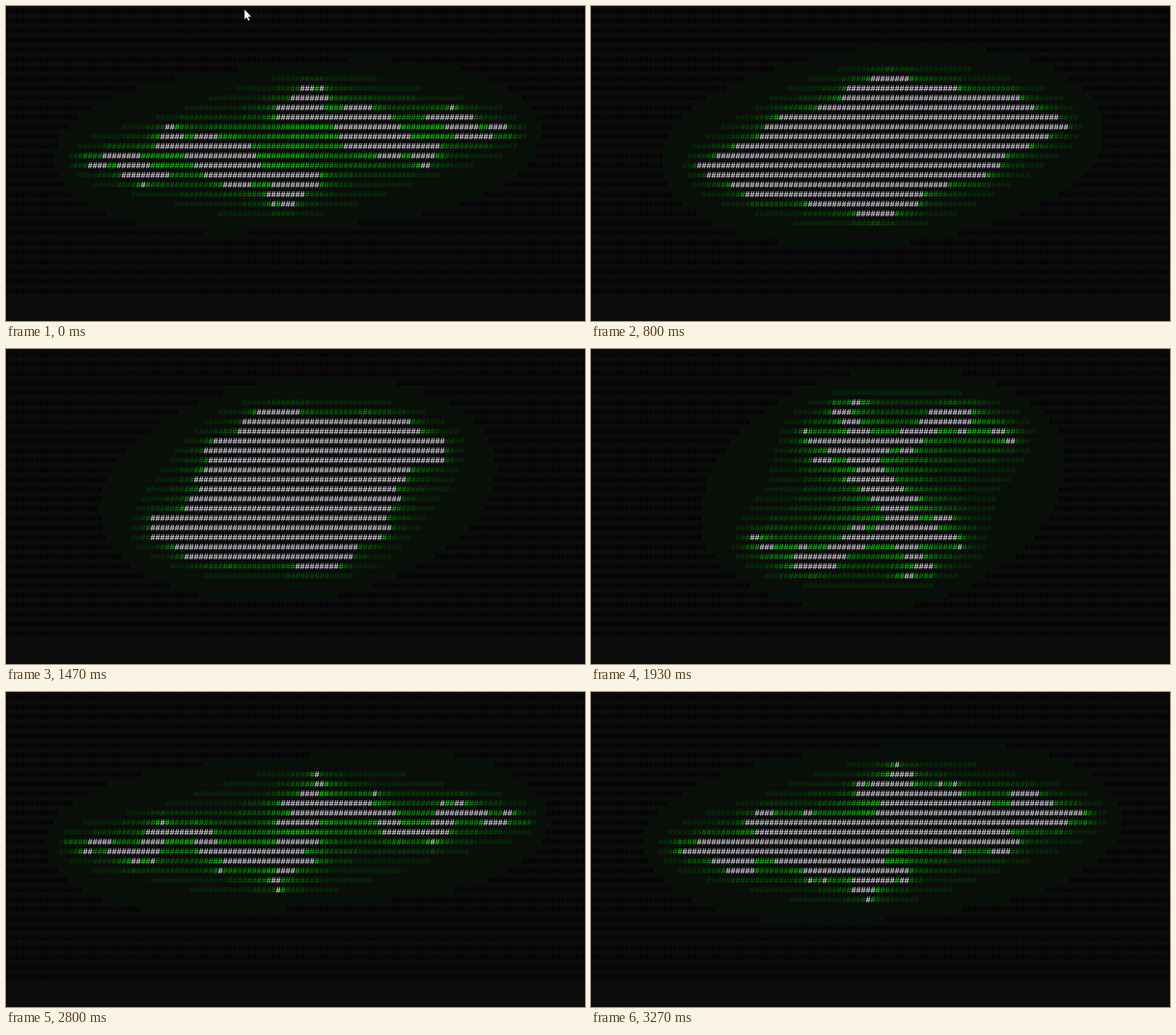
Write an HTML page with a canvas that moves like this. It is 960 px wide and 523 px high and loops after 3340 ms.

```html
<!DOCTYPE html>
<html lang="en">
<head>
<meta charset="utf-8">
<title>Julia set in a terminal</title>
<style>
  html, body { margin: 0; height: 100%; overflow: hidden; background: #0c0c0c; }
  canvas { display: block; }
</style>
</head>
<body>
<canvas id="stage" width="960" height="523"></canvas>
<script>
const ctx = document.getElementById('stage').getContext('2d');
const LOOP = 3340, FPS = 15, STEPS = 50, RESTART = 42;
const COLS = 120, ROWS = 30, CELL_W = 8, CELL_H = 16;
const MAX_ITER = 10;

// Dark to bright green by escape count, white for points that stay.
function colorOf(n) {
  return n === MAX_ITER ? '#ededf8' : `rgb(0,${Math.round(255 * n / (MAX_ITER - 1))},0)`;
}

// c sweeps along the real axis at a slightly uneven pace, then starts over at -1.
function realPart(step) {
  if (step >= RESTART) return -1 + 0.043 * (step - RESTART);
  return -0.805 + 0.0428 * step - 0.026 * Math.sin(2 * Math.PI * step / 35);
}

function imagPart(step) {
  return 0.335 + 0.00022 * step;
}

function escapeCount(x, y, cr, ci) {
  let n = 0;
  while (n < MAX_ITER) {
    const nx = x * x - y * y + cr;
    y = 2 * x * y + ci;
    x = nx;
    if (x * x + y * y > 4) break;
    n++;
  }
  return n;
}

function drawPointer(x, y) {
  const outline = [[0, 0], [0, 16], [3.7, 12.6], [6.2, 18.5], [8.4, 17.5], [6, 11.8], [11, 11.5]];
  ctx.beginPath();
  for (const [dx, dy] of outline) ctx.lineTo(x + dx, y + dy);
  ctx.closePath();
  ctx.fillStyle = '#fff';
  ctx.fill();
}

function draw(step) {
  const cr = realPart(step), ci = imagPart(step);
  ctx.fillStyle = '#0c0c0c';
  ctx.fillRect(0, 0, 960, 523);
  ctx.font = '13.333px "Liberation Mono", "DejaVu Sans Mono", monospace';
  ctx.textBaseline = 'alphabetic';
  ctx.lineWidth = 0.3;
  for (let row = 0; row < ROWS; row++) {
    for (let col = 0; col < COLS; col++) {
      const x = col * CELL_W - 0.5, y = row * CELL_H + 13;
      ctx.fillStyle = ctx.strokeStyle = colorOf(escapeCount((col - 60) / 30, (row - 14) / 8, cr, ci));
      ctx.fillText('#', x, y);
      ctx.strokeText('#', x, y);
    }
  }
  if (step === 0) drawPointer(395.5, 6);
}

const start = performance.now();
let shown = -1;

function tick() {
  const t = (performance.now() - start) % LOOP;
  const step = Math.min(STEPS - 1, Math.floor(t * FPS / 1000 + 0.06));
  if (step !== shown) draw(shown = step);
  requestAnimationFrame(tick);
}
tick();
</script>
</body>
</html>
```
